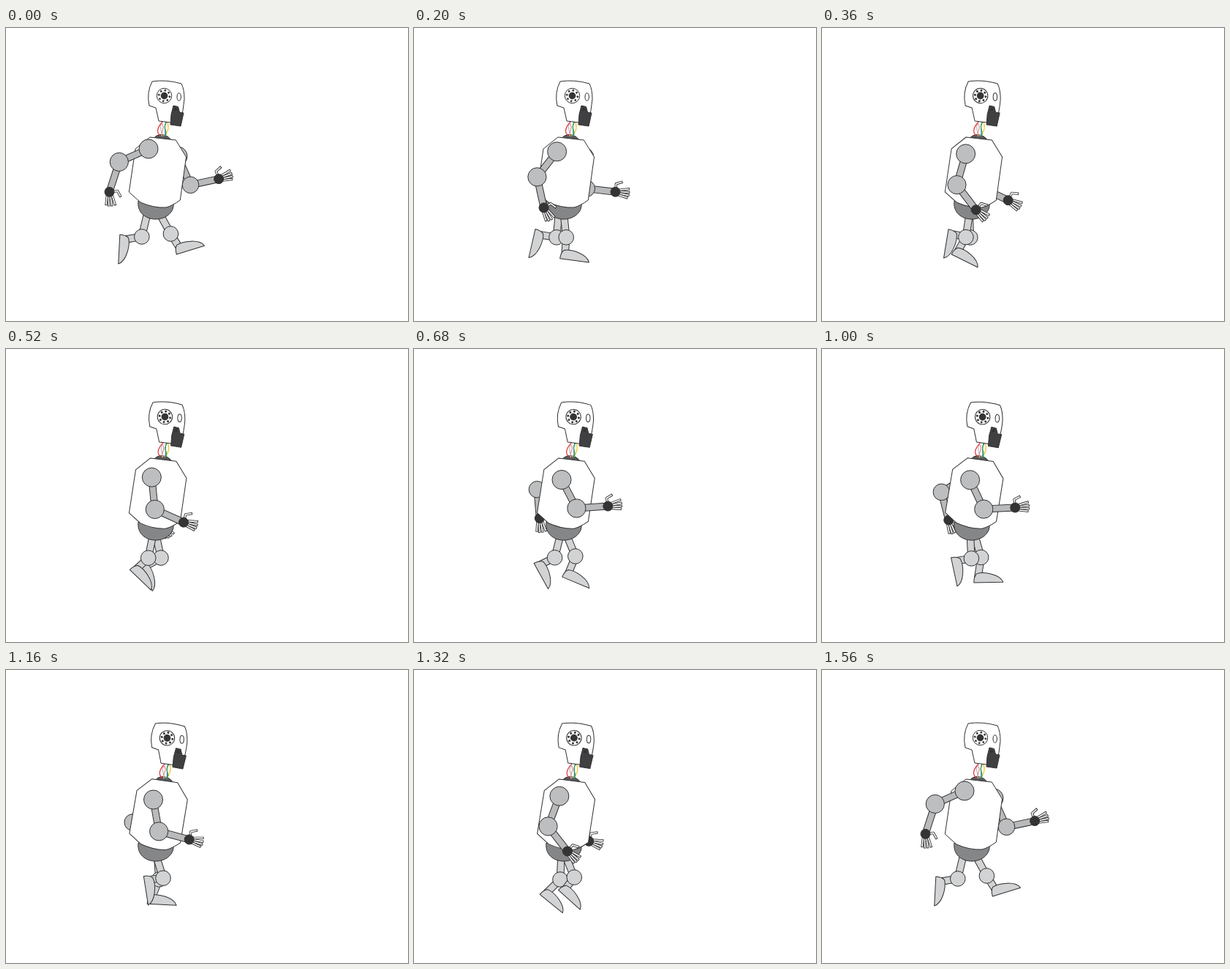
These frames come from a looping animation (550x400 px, 1600 ms). An HTML page with a canvas:

```html
<!DOCTYPE html>
<html lang="en">
<head>
<meta charset="utf-8">
<title>Walking robot</title>
<style>
html, body { margin: 0; width: 100%; height: 100%; overflow: hidden; background: #fff; }
canvas { display: block; }
</style>
</head>
<body>
<canvas id="stage" width="550" height="400"></canvas>
<script>
const ctx = document.getElementById('stage').getContext('2d');
const LOOP = 1600, STEP = 40, RAD = Math.PI / 180;
const INK = '#333132', DARK = '#353435', JOINT = '#bcbec0', ARM = '#b8babc', LEG = '#d1d3d4';

// Pose times; the last pose equals the first. Angles in degrees, clockwise from the right.
const TIMES = [0, 320, 800, 1160, 1560];
const NEAR_ARM = {
  x: [195, 196, 204, 201.5], y: [165, 171, 181, 177],
  upper: [156, 111.5, 46, 80], lower: [108, 59.5, -25, 15], tip: [88, 49, -23, 16]
};
const FAR_ARM = {
  x: [235, 231.5, 198, 202], y: [175, 177, 169.5, 176],
  upper: [66, 97, 170, 132], lower: [-12, 18, 107.5, 50], tip: [-15, 25, 106, 42]
};
const NEAR_LEG = {
  x: [206, 203, 202, 203], y: [246, 246, 246, 246],
  upper: [61, 98, 106, 72.5], lower: [58, 115.5, 167, 174], tip: [-17, 22, 74, 81],
  shin: [20.8, 21, 19.2, 17]
};
const FAR_LEG = {
  x: [195, 201, 207, 206.5], y: [246, 246, 246, 246],
  upper: [103.3, 90.7, 59.7, 85.7], lower: [170.7, 200, 83, 111.8], tip: [93, 109, -6, 3],
  shin: [21.6, 22, 24.6, 26.5]
};
const LEAN = [0, 0, 0.8, 1.5];

const TORSO = new Path2D('M197 149L232.3 153L246.5 176L238.3 235Q227 243 219 245Q202 246 184 238L168.3 224L177 165Z');
const PELVIS = new Path2D('M181 236C179 251 190 261 205 261C219 261 231 251 229 238Z');
const COLLAR = new Path2D('M202 151C206 144 219 143 226 153Z');
const SKULL = new Path2D('M200 73Q219 70 240 76Q244 84 244 97Q243 112 238 129L225 129L209 127L205 109L196 106Q192 88 200 73Z');
const JAW = new Path2D('M229 106L235.5 107.5L237.5 115L243 116L239 134L225 132L226 118Z');
const FOOT = new Path2D('M0 0Q0 -8 4 -12C14 -15 36 -11 40 0Z');
const WIRES = [
  ['#b9bbbd', 'M214 128C208 137 215 142 213 148'],
  ['#e0333a', 'M214 128C206 137 206 143 211 147'],
  ['#e58a8d', 'M212 129C220 136 210 142 214 148'],
  ['#f0c419', 'M221 129C224 138 220 145 215 147'],
  ['#2a7fc0', 'M219 128C215 136 220 141 217 148'],
  ['#35a04a', 'M220 128C213 138 222 139 218 148']
].map(([color, d]) => [color, new Path2D(d)]);

function paint(path, fill) {
  ctx.fillStyle = fill;
  ctx.fill(path);
  ctx.strokeStyle = INK;
  ctx.lineWidth = 1;
  ctx.stroke(path);
}

function oval(x, y, rx, ry, fill) {
  const path = new Path2D();
  path.ellipse(x, y, rx, ry, 0, 0, 2 * Math.PI);
  paint(path, fill);
}

const disc = (p, r, fill) => oval(p.x, p.y, r, r, fill);

function placed(p, deg, draw) {
  ctx.save();
  ctx.translate(p.x, p.y);
  ctx.rotate(deg * RAD);
  draw();
  ctx.restore();
}

function bar(p, deg, length, width, fill) {
  placed(p, deg, () => {
    const path = new Path2D();
    path.rect(0, -width / 2, length, width);
    paint(path, fill);
  });
}

const reach = (p, deg, length) => ({
  x: p.x + length * Math.cos(deg * RAD),
  y: p.y + length * Math.sin(deg * RAD)
});

function finger(d) {
  const path = new Path2D(d);
  ctx.lineCap = 'square';
  for (const [color, width] of [[INK, 3.4], ['#fff', 1.6]]) {
    ctx.strokeStyle = color;
    ctx.lineWidth = width;
    ctx.stroke(path);
  }
  ctx.lineCap = 'butt';
}

function hand(p, deg) {
  placed(p, deg, () => {
    finger('M3 -3L17 -7');
    finger('M3 -1L18 -2.5');
    finger('M3 1L18 1.5');
    finger('M3 3L16.5 5');
    finger('M0 -4L-1 -11L6 -14.5');
  });
  disc(p, 6.5, DARK);
}

function foot(p, deg) {
  placed(p, deg, () => {
    ctx.translate(-6, 9);
    paint(FOOT, LEG);
  });
}

function arm(pose, upperLength, lowerLength, elbowSize) {
  const elbow = reach(pose, pose.upper, upperLength);
  const wrist = reach(elbow, pose.lower, lowerLength);
  bar(pose, pose.upper, upperLength, 9, ARM);
  bar(elbow, pose.lower, lowerLength, 9, ARM);
  disc(pose, 13, JOINT);
  disc(elbow, elbowSize, JOINT);
  hand(wrist, pose.tip);
}

function leg(pose) {
  const knee = reach(pose, pose.upper, 40);
  const ankle = reach(knee, pose.lower, pose.shin);
  bar(pose, pose.upper, 40, 9.5, LEG);
  bar(knee, pose.lower, pose.shin + 2, 9.5, LEG);
  disc(knee, 10.3, LEG);
  foot(ankle, pose.tip);
}

function head() {
  paint(SKULL, '#fff');
  oval(216.5, 92.5, 10.2, 10.2, '#fff');
  oval(216.5, 92.5, 4.4, 4.4, DARK);
  for (let i = 0; i < 8; i++) {
    const dot = reach({ x: 216.5, y: 92.5 }, i * 45 + 10, 7.4);
    disc(dot, 1, DARK);
  }
  oval(236.7, 94, 2.7, 5.3, '#fff');
  paint(JAW, '#403f41');
  oval(232, 111, 1.5, 1.5, DARK);
}

function body(lean) {
  ctx.save();
  ctx.translate(205, 245);
  ctx.rotate(lean * RAD);
  ctx.translate(-205, -245);
  paint(COLLAR, '#58595b');
  ctx.lineWidth = 1.2;
  for (const [color, path] of WIRES) {
    ctx.strokeStyle = color;
    ctx.stroke(path);
  }
  paint(TORSO, '#fff');
  head();
  ctx.restore();
}

function render(time) {
  const t = Math.min(Math.floor(time % LOOP / STEP) * STEP, TIMES[4]);
  const i = Math.min(3, TIMES.filter(key => key <= t).length - 1);
  const part = (t - TIMES[i]) / (TIMES[i + 1] - TIMES[i]);
  const at = track => track[i] + (track[(i + 1) % 4] - track[i]) * part;
  const pose = limb => Object.fromEntries(
    Object.entries(limb).map(([name, track]) => [name, at(track)]));

  ctx.fillStyle = '#fff';
  ctx.fillRect(0, 0, 550, 400);
  ctx.lineJoin = 'round';
  arm(pose(FAR_ARM), 43, 39.5, 11.3);
  leg(pose(FAR_LEG));
  leg(pose(NEAR_LEG));
  paint(PELVIS, '#858688');
  body(at(LEAN));
  arm(pose(NEAR_ARM), 44, 43, 12.6);
}

const start = performance.now();
function tick() {
  render(performance.now() - start);
  requestAnimationFrame(tick);
}
tick();
</script>
</body>
</html>
```
